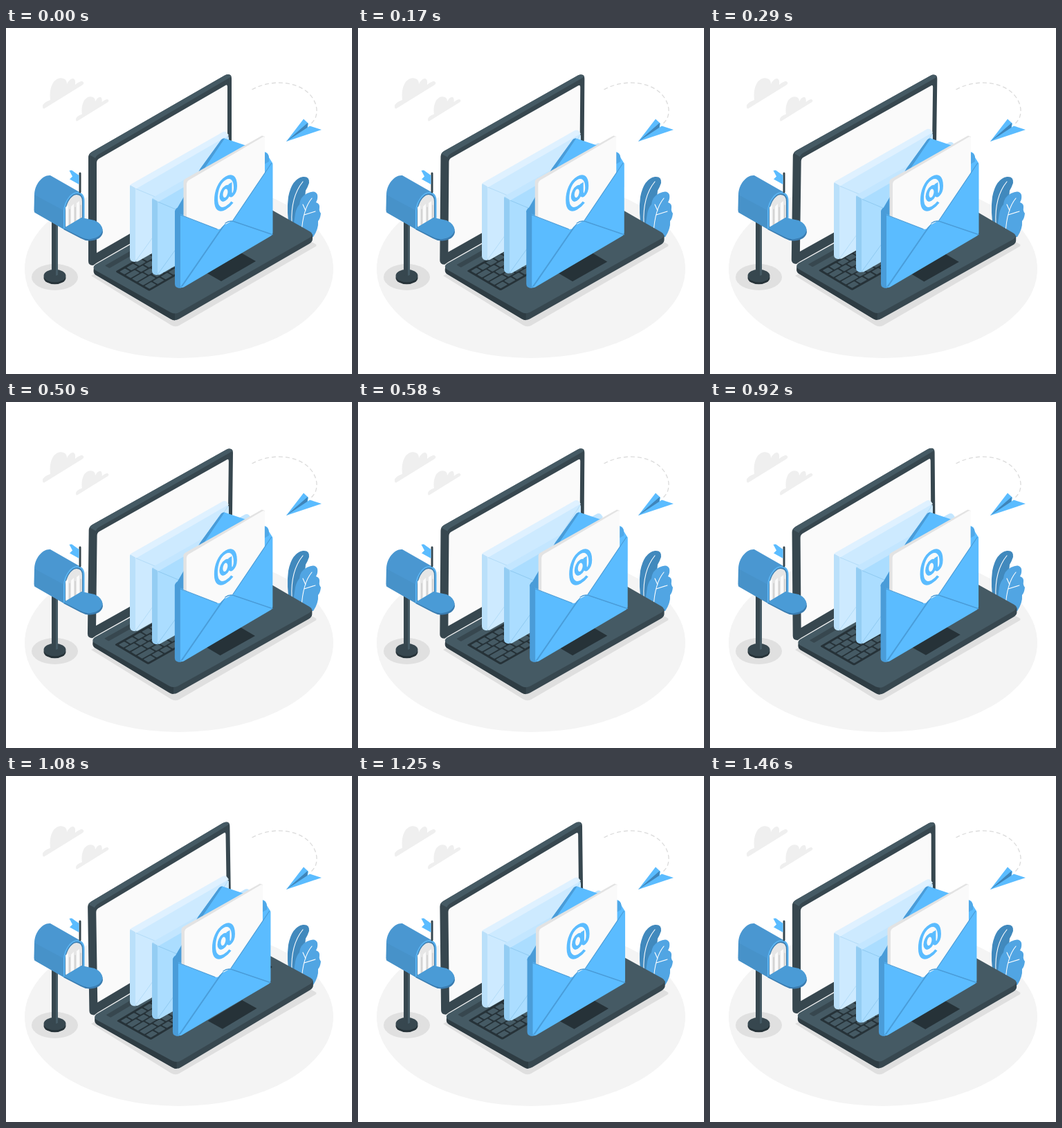
An HTML page that plays this animation: 500x500 px, repeating every 1500 ms.

```html
<!DOCTYPE html>
<html lang="en">
<head>
<meta charset="utf-8">
<title>Mail</title>
<style>
html, body { margin: 0; width: 100%; height: 100%; overflow: hidden; background: #fff; }
svg { display: block; width: 100vw; height: 100vh; }
</style>
</head>
<body>
<svg viewBox="0 0 500 500" fill="none" stroke-linecap="round" stroke-linejoin="round">
  <defs>
    <path id="cloud" d="M53 113Q53 108 64 104Q62 90 68 79Q76 69 85 74Q88 76 88 81Q92 73 97 73Q101 74 100 82Q106 77 110 77Q114 79 111 82L56 116Q53 118 53 113Z" fill="#efefef"/>
  </defs>

  <!-- floor and sky -->
  <ellipse cx="250" cy="348" rx="223" ry="129" fill="#f4f4f4"/>
  <ellipse cx="70.500" cy="360" rx="33.500" ry="19" fill="#e0e0e0"/>
  <path d="M123 358L238 429Q244 433 250 430L447 316Q450 314 447 312L330 250Z" fill="#dfdfdf"/>
  <use href="#cloud"/>
  <use href="#cloud" transform="translate(58.600 41.400) scale(.8)"/>
  <path d="M355.500 89C384 73 426 76 443 101C452 115 451 130 440 139" stroke="#dbdbdb" stroke-width="1.300" stroke-dasharray="6 4" stroke-linecap="butt"/>
  <path d="M405 164L430 131.500L437 138L435 148Z" fill="#5bbcff"/>
  <path d="M405 164L436 137L435 149L420 156Z" fill="#3f85ba"/>
  <path d="M405 164L439 141.500L456 147Z" fill="#5bbcff"/>

  <!-- plant -->
  <path d="M410 292Q405 265 408 244Q413 218 429 215Q439 214 438 224Q436 230 433 235Q431 262 424 296Z" fill="#4189bd"/>
  <path d="M413 282C412 260 416 238 429 222" stroke="#fff" stroke-width="1.100"/>
  <path d="M415 299Q415 284 418 268Q420 259 424 255Q425 244 435 239Q447 233 450 241Q451 247 448 252Q454 254 453 260Q452 264 455 268Q454 276 451 279Q452 290 444 302Z" fill="#51a5e3"/>
  <path d="M427 297C428 278 431 259 442 246M431 270L447 265M429 255L433 264" stroke="#fff" stroke-width="1.100"/>

  <!-- laptop -->
  <g id="laptop">
    <path d="M127 346L244 409L443 298V305Q443 309 438 312L250 420.500Q244 424 238 420.500L130 357Q126.500 355 126.500 351Z" fill="#37474f"/>
    <path d="M127 347V351Q127 355 130 357L238 420.500Q241 422.500 244 422.500V409Z" fill="#2e3c43"/>
    <path d="M129 342L318 234Q326 230 333 234L439 294Q446 298 439 303L250 411Q244 414 238 411L129 350Q124 346 129 342Z" fill="#455a64"/>
    <g id="keyboard" transform="matrix(1 -.577 1 .577 158 352)">
      <rect y="-15" width="178" height="6.500" rx="1" fill="#37474f"/>
      <rect width="178" height="49" rx="2" fill="#263238"/>
    </g>
    <path d="M290 354L340 325L361 337L311 366Z" fill="#263238"/>
    <path d="M119 187Q119 182 124 179L316 68.500Q326 64 326 73V227L131 339.500L126 343Q119 343 119 337Z" fill="#37474f"/>
    <path d="M120 183Q121 181 124 179L316 68.500Q322 65 325.500 70L321 73L133 183Q130 185 129 188Z" fill="#455a64"/>
    <path d="M131 195Q131 191 134 189L317 83Q320 81 320 85V216L131 325Z" fill="#fafafa"/>
  </g>

  <g id="rear"></g>

  <!-- open envelope -->
  <g id="front">
    <path d="M244 266Q244 262 248 259.500L281 203L311 161.500Q314 158 319 160.500L374 179Q379 180 380 187L385 195V230L262 290Z" fill="#5bbcff"/>
    <path d="M244 266Q244 262 248 259.500L281 203L311 161.500Q313 159 316 159.500L288 201L258 271Z" fill="#4a9cd8"/>
    <path d="M373 180Q379 180 380 187L380 193L373 197Z" fill="#4fa8e8"/>
    <path d="M256.500 222Q256.500 219.500 259 218L370 155.500L374 157L340 262L312 296L256.500 278Z" fill="#e3e3e3"/>
    <path d="M261 225Q261 222 264 220L371 157.500Q374 156 374 159V215L330 290L311 300L261 283Z" fill="#fafafa"/>
    <g transform="matrix(1 -.577 0 1 317.500 238.500)" stroke="#5bbcff" stroke-width="5" stroke-linecap="butt">
      <ellipse cx="-.5" rx="6" ry="8.500"/>
      <path d="M6.500 -10.500V3C6.500 11 14 10 14 -1C14 -14 8 -21.500 0 -21.500C-9 -21.500 -14 -12 -14 1C-14 14 -8 21.500 0 21.500C4 21.500 7 20.500 9.500 18.500"/>
    </g>
    <path d="M244 266Q244 263 247 264L253 271V376Q244 376 244 370Z" fill="#4a9cd8"/>
    <path d="M252 270.500L305 290.500Q311 292 315 285L328 278L383 196Q385.500 193 385.500 197V295Q385.500 299 382 301L257 374.500Q252 377 252 372Z" fill="#5bbcff"/>
    <path d="M247 265Q249 268 252 270L305 290.500" stroke="#4a9cd8" stroke-width="1.300"/>
    <path d="M253 373.500L312 288L317 283L255 373Z" fill="#4a9cd8" stroke="#4a9cd8" stroke-width=".7"/>
    <path d="M385 298.500L332 280.500Q324 277 317 282" stroke="#4a9cd8" stroke-width="1.400"/>
    <path d="M328 278L383.500 195.500" stroke="#4a9cd8" stroke-width="1.200"/>
  </g>

  <!-- mailbox -->
  <ellipse cx="70.500" cy="361" rx="16" ry="9.300" fill="#263238"/>
  <ellipse cx="70.500" cy="358" rx="16" ry="9.300" fill="#37474f"/>
  <path d="M66 278H75V357Q70.500 360 66 357Z" fill="#37474f"/>
  <path d="M72 280H75V357L72 358Z" fill="#455a64"/>
  <path d="M41 241C41 226 53 212 64 213L106 237L113 262L84 291L41 266Z" fill="#4a97d1"/>
  <path d="M41 241L84 264V291L42 267Q40.500 266 40.500 263Z" fill="#4792c9"/>
  <path d="M83.500 290V264C84 250 93 237 103 237Q113 238 113 250V274Z" fill="#3f80b2"/>
  <path d="M86 288V265C87 252 95 241 102 241Q110 241 110 251V274Z" fill="#e6e6e6"/>
  <path d="M86 286V259L90 256V287ZM94 283V258L98 254V281ZM102 278V253L106 250V276Z" fill="#fafafa"/>
  <path d="M92 262V284M100 259V280M108 256V275" stroke="#c9c9c9" stroke-width="1.200"/>
  <path d="M84 290V264C85 250 94 238 103 238Q112.500 239 112.500 250V275" stroke="#5bb4f2" stroke-width="2"/>
  <path d="M83 291L109 275L130 280Q140 285 140 295Q138 306 122 307.500Q115 308 108 304Z" fill="#3a7cb0"/>
  <path d="M83 289.500L109 274L128 278Q139 283 139.500 292Q137 303 122 305Q115 306 108 302Z" fill="#4a9bd6"/>
  <path d="M107 210V237" stroke="#37474f" stroke-width="3"/>
  <path d="M91.500 206L95 205.500L105.500 213V226L92 218.500L96 214.500Z" fill="#5bbcff"/>
</svg>
<script>
const LOOP = 1500;
const $ = id => document.getElementById(id);

// closed envelope; colours: front, top, side, seam
const envelope = (x, y, [front, top, side, seam]) => `<g transform="translate(${x} ${y})">
  <path d="M179 229Q179 226 182 225L312 151Q316 148.500 319 151L322 155L190 240L183 238Z" fill="${top}"/>
  <path d="M179 228L187.500 232.500V338Q179 338 179 332Z" fill="${side}"/>
  <path d="M187 233L319 156.500Q322 155 322 159V258Q322 262 319 264L191 337Q187 339 187 335Z" fill="${front}"/>
  <path d="M180 228L187 232L249 258Q254 260 258 254L321 157M188 336L247 254M321 261L262 248" stroke="${seam}" stroke-width="1"/>
  <path d="M187 232L318 156" stroke="${top}" stroke-width="1"/></g>`;

$('rear').innerHTML =
  envelope(0, 0, ['#cdeaff', '#dff1ff', '#bae0fa', '#b3dcf8']) +
  envelope(32, 19, ['#abddff', '#c3e6ff', '#94cdf3', '#8fcaf1']);

// keys, first one of each row has its own width
let keys = '';
[8, 13, 15, 18, 10].forEach((first, row) => {
  let x = 3, w = first;
  while (x < 174) {
    w = Math.min(w, 175 - x);
    keys += `<rect x="${x}" y="${3 + row * 9}" width="${w}" height="7.2" rx="1" fill="#455a64"/>`;
    x += w + 2;
    w = row === 4 && x > 45 && x < 60 ? 58 : 9.5;
  }
});
$('keyboard').insertAdjacentHTML('beforeend', keys);

const mix = (a, b, p) => a + (b - a) * p;

// cubic-bezier(.25, .1, .25, 1)
function ease(x) {
  let lo = 0, hi = 1, s = .5;
  for (let i = 0; i < 20; i++) {
    s = (lo + hi) / 2;
    if (.75 * s * (1 - s) + s ** 3 < x) lo = s; else hi = s;
  }
  return .3 * (1 - s) ** 2 * s + 3 * (1 - s) * s * s + s ** 3;
}

const SHAKE = [0, -1.5, 3, -6.5, 4.3, -6.5, 4.3, -6, 3.5, -1.5, 0];

function draw(ms) {
  const p = ms % LOOP / LOOP;
  const tilt = p < .25 ? p * 4 : p < .75 ? 2 - p * 4 : p * 4 - 4;
  const lift = -10 * (1 - Math.abs(1 - 2 * p));
  const k = Math.floor(p * 10);
  const shake = mix(SHAKE[k], SHAKE[k + 1], ease(p * 10 - k));
  $('laptop').setAttribute('transform', `rotate(${tilt} 281 245)`);
  $('rear').setAttribute('transform', `translate(0 ${lift})`);
  $('front').setAttribute('transform', `translate(${shake} 0)`);
}

function tick() {
  draw(performance.now());
  requestAnimationFrame(tick);
}
tick();
</script>
</body>
</html>
```
